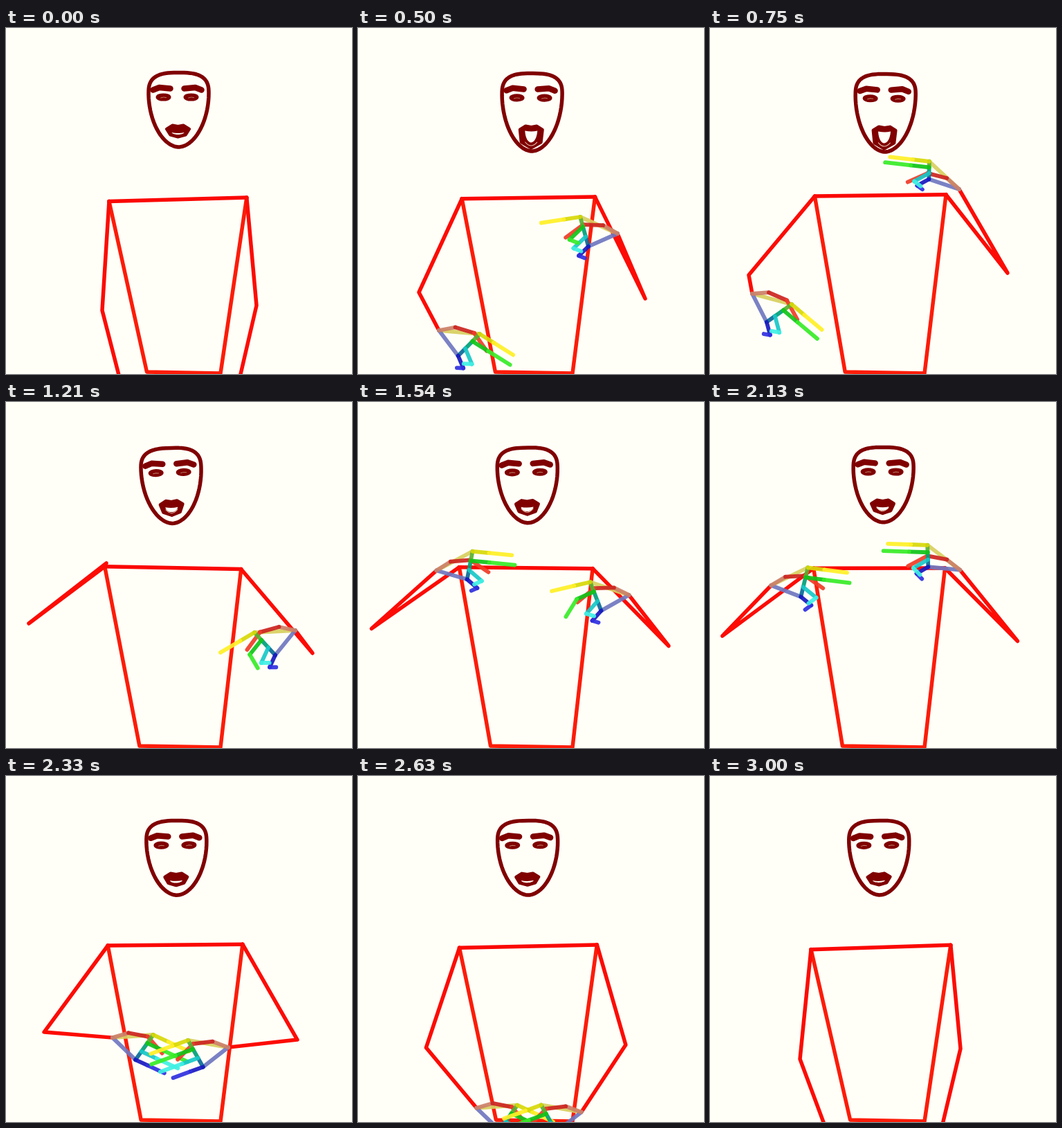
Recreate the animation shown at these times as an HTML page with a canvas. Size 500 px wide and 500 px high, loop 3.04 s.

```html
<!DOCTYPE html>
<html lang="en">
<head>
<meta charset="utf-8">
<title>Signing pose</title>
<style>
html, body { margin: 0; height: 100%; overflow: hidden; background: #fffff8; }
canvas { display: block; width: 500px; height: 500px; }
</style>
</head>
<body>
<canvas id="stage" width="500" height="500"></canvas>
<script>
const ctx = document.getElementById('stage').getContext('2d');
const PAPER = '#fffff8', FACE = '#800000';
const LOOP = 3040, STEP = 1000 / 24, LAST = 72;

const easeIn = p => u => u ** p;
const easeOut = p => u => 1 - (1 - u) ** p;
const smooth = u => u * u * (3 - 2 * u);

// arm: elbow x, y, wrist x, y, palm angle, grip (0 flat, 1 two fingers out, 2 one finger out)
// head: x, y, mouth opening; ease and bow (outward elbow swing) lead to the next pose
const poses = [
  { time: 0, ease: easeIn(2), bow: 0,
    left: [139, 408, 176, 552, -5, 1], right: [362, 401, 327, 552, 24, 2], head: [0, 0, 0] },
  { time: 500, ease: easeOut(3), bow: 0,
    left: [88, 382, 117, 437, -5, 1], right: [415, 391, 375, 297, 24, 2], head: [2, 1, 1] },
  { time: 750, ease: smooth, bow: 14,
    left: [56, 357, 61, 384, -15, 1], right: [430, 354, 360, 233, 43, 1], head: [4, 2, 1] },
  { time: 1208, ease: smooth, bow: 9,
    left: [33, 320, 145, 233, 28, 1], right: [443, 363, 418, 330, -3, 1.6], head: [-10.5, 2, .3] },
  { time: 1875, ease: easeIn(4), bow: 9,
    left: [24, 335, 82, 254, 28, 1], right: [437, 342, 365, 228, 40, 1], head: [1.5, 1, .2] },
  { time: 2333, ease: easeOut(1.5), bow: 0,
    left: [55, 370, 154, 378, 4, 0], right: [421, 381, 321, 392, 10, 0], head: [-3, 0, .05] },
  { time: 3000,
    left: [130, 409, 184, 554, 4, 0], right: [362, 394, 324, 554, 10, 0], head: [-5, 0, 0] },
];

const lerp = (a, b, k) => a.map((p, i) => p + (b[i] - p) * k);

function poseAt(time) {
  const i = Math.max(0, poses.findIndex(p => p.time >= time) - 1);
  const a = poses[i], b = poses[i + 1];
  const u = (time - a.time) / (b.time - a.time), k = a.ease(u);
  const swing = a.bow * Math.sin(Math.PI * u);
  const [left, right, head] = ['left', 'right', 'head'].map(part => lerp(a[part], b[part], k));
  left[0] -= swing;
  right[0] += swing;
  return { left, right, head };
}

function line(color, width, ...points) {
  ctx.strokeStyle = color;
  ctx.lineWidth = width;
  ctx.beginPath();
  points.forEach(p => ctx.lineTo(...p));
  ctx.stroke();
}

// Shoulders rise with the elbows and lean with the head
function drawBody({ left, right, head }) {
  const ls = [149 + .6 * head[0], 250.5 - .145 * (408 - left[1])];
  const rs = [341 + .1 * (430 - right[0]), 245 - .09 * (401 - right[1])];
  const lh = [192 + .1 * (left[0] - 24), 497], rh = [310, 499];
  line('#fc1c08', 5.5, ls, lh, rh, rs);
  line('#fa0804', 5.5, ls, rs);
  for (const [shoulder, arm] of [[ls, left], [rs, right]]) {
    line('#fc0c04', 5.5, shoulder, arm.slice(0, 2), arm.slice(2, 4));
  }
}

// Angles are in degrees above the horizontal; side is 1 when the fingers point right
function drawHand([, , x, y, angle, grip], side) {
  const step = ([px, py], length, degrees) => {
    const r = degrees * Math.PI / 180;
    return [px + side * length * Math.cos(r), py - length * Math.sin(r)];
  };
  const part = (color, ...points) => line(color, 5.8, ...points);
  const wrist = [x, y];
  const spread = 48 - 1.3 * Math.max(0, angle - 25);
  const index = step(wrist, 59, angle), little = step(wrist, 46, angle - spread);
  const middle = lerp(index, little, 1 / 3), ring = lerp(index, little, 2 / 3);
  const aim = .8 * angle - 28, curl = Math.min(1, grip);

  function finger(knuckle, length, bend, dark, bright) {
    const joint = step(knuckle, .42 * length, aim - 35 * bend);
    part(dark, knuckle, joint);
    part(bright, joint, step(joint, .58 * length * (1 - .65 * bend), aim - 150 * bend));
  }

  ctx.globalAlpha = .92;
  part('#d8d060', wrist, index);
  part('#7078c0', wrist, little);
  const [base, joint, tip] = [[24, 14], [51, -1], [75, -20]]
    .map(([length, turn]) => step(wrist, length, .65 * angle + turn));
  part('#cc8068', wrist, base);
  part('#cc2420', base, joint);
  part('#f03c28', joint, tip);
  part('#0a6a98', ring, little);
  part('#00a078', middle, ring);
  part('#58b030', index, middle);
  finger(little, 46, curl, '#1818c0', '#3030e0');
  finger(ring, 58, curl, '#18c8c8', '#40f0e4');
  finger(middle, 64, Math.max(0, grip - 1), '#10c418', '#38ec28');
  finger(index, 57, 0, '#d8d808', '#fff028');
  ctx.globalAlpha = 1;
}

// A squarish forehead over an elliptical jaw
function traceFace(jaw) {
  const bend = (v, n) => Math.sign(v) * Math.abs(v) ** (2 / n);
  ctx.beginPath();
  for (let a = 0; a < 2 * Math.PI; a += .08) {
    const s = Math.sin(a), n = s < 0 ? 2.9 : 1.9;
    ctx.lineTo(249.5 + 43.5 * bend(Math.cos(a), n), 95 + (s < 0 ? 30.5 : 77 + jaw) * bend(s, n));
  }
  ctx.closePath();
  ctx.stroke();
}

function drawMouth(open) {
  const low = 157 + 15 * open, corner = 154 + 10 * open, wide = 11 + 3 * open;
  ctx.lineWidth = 5;
  ctx.beginPath();
  for (const [x, y] of [[-16, 146], [-8, 141], [0, 142.5], [8, 141], [16, 146],
    [wide, corner], [0, low], [-wide, corner]]) ctx.lineTo(248.5 + x, y);
  ctx.closePath();
  ctx.fill();
  ctx.stroke();

  const top = 151 - 3.5 * open, dip = 155 + 15 * open;
  ctx.fillStyle = PAPER;
  ctx.beginPath();
  ctx.moveTo(239.5, top);
  ctx.quadraticCurveTo(248.5, top + 2, 257.5, top);
  ctx.bezierCurveTo(256, dip, 241, dip, 239.5, top);
  ctx.fill();
  if (open > .1) {
    ctx.strokeStyle = '#e8c8b4';
    ctx.lineWidth = 1;
    ctx.beginPath();
    ctx.moveTo(240, low - 8);
    ctx.quadraticCurveTo(248.5, low + 2, 257, low - 8);
    ctx.stroke();
  }
}

function drawHead([x, y, open]) {
  ctx.save();
  ctx.translate(248 + x, 110 + y);
  ctx.rotate(.003 * x);
  ctx.translate(-248, -110);
  ctx.strokeStyle = ctx.fillStyle = FACE;
  ctx.lineWidth = 5.5;
  traceFace(5 * open);
  for (const side of [-1, 1]) {
    const cx = 247.5 + 20 * side;
    line(FACE, 8.5, [cx + 15 * side, 89.5], [cx + 6 * side, 86], [cx - 10 * side, 87.5]);
    ctx.lineWidth = 4;
    ctx.beginPath();
    ctx.ellipse(cx, 100, 9, 3.6, 0, 0, 2 * Math.PI);
    ctx.fill();
    ctx.stroke();
    line('#b88068', 1, [cx - 4, 101], [cx, 100], [cx + 4, 100.5]);
  }
  ctx.strokeStyle = FACE;
  drawMouth(open);
  ctx.restore();
}

function draw(now) {
  const frame = Math.floor((now % LOOP + 4.9) / STEP);
  const time = Math.min(LAST, frame) * STEP;
  const pose = poseAt(time);
  ctx.fillStyle = PAPER;
  ctx.fillRect(0, 0, 500, 500);
  ctx.lineCap = ctx.lineJoin = 'round';
  drawBody(pose);
  drawHead(pose.head);
  // The left hand is lost while it passes the shoulder
  if (time < 1120 || time > 1340) drawHand(pose.left, 1);
  drawHand(pose.right, -1);
}

const start = performance.now();
function tick() {
  draw(performance.now() - start);
  requestAnimationFrame(tick);
}
tick();
</script>
</body>
</html>
```
